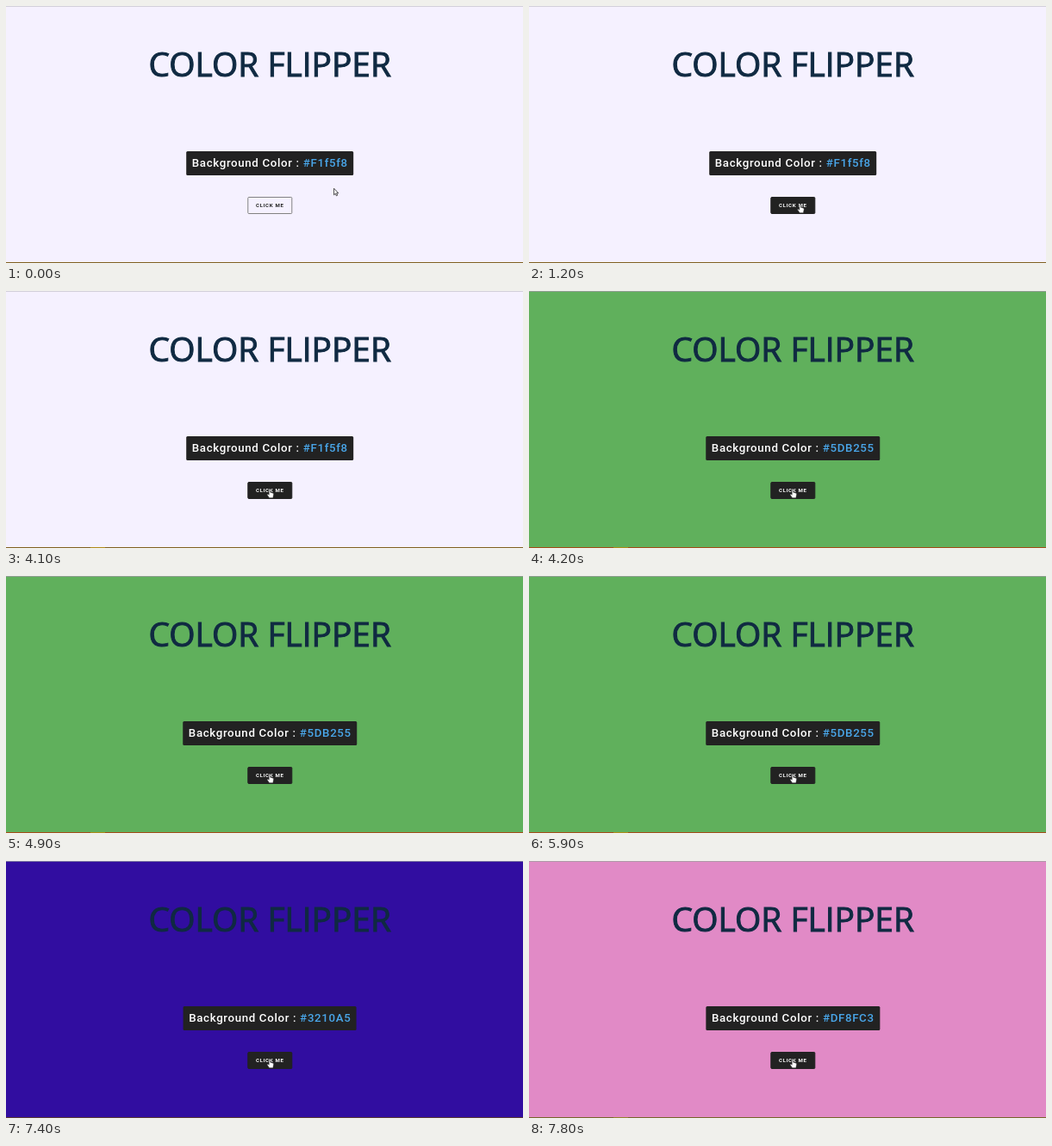
Write an HTML page that moves like this. It is 600x299 px and loops after 8000 ms.

```html
<!DOCTYPE html>
<html lang="en">
<head>
<meta charset="utf-8">
<title>Color Flipper</title>
<style>
html, body { margin: 0; width: 100%; height: 100%; overflow: hidden; }
#stage { position: relative; width: 600px; height: 299px; overflow: hidden; }
#stage > * { position: absolute; white-space: nowrap; }
h1, #label, #button { left: 306.3px; transform: translateX(-50%); margin: 0; box-sizing: border-box; }
h1 {
  top: 39px; font: 400 38.9px/56px "Open Sans", "Noto Sans", sans-serif;
  color: #102a42; -webkit-text-stroke: 1px #102a42;
}
#label {
  top: 168.5px; height: 28.2px; padding: 0 6.3px; border-radius: 1.5px; background: #222;
  font: 500 13.3px/28.4px Roboto, sans-serif; letter-spacing: .65px; color: #fff;
}
#code { color: #49a6e9; }
#button {
  top: 222.2px; width: 51.4px; height: 20px; border: 1px solid; border-radius: 1.5px;
  font: 700 6.1px/18.4px Roboto, sans-serif; letter-spacing: .65px; text-align: center;
}
.edge { left: 0; width: 600px; height: 1px; }
#top { top: 0; }
#bottom { top: 298px; }
#mark { left: 98px; top: 298px; width: 17px; height: 1px; }
svg { left: 0; top: 0; width: 16px; height: 16px; overflow: visible; }
</style>
</head>
<body>
<div id="stage">
  <div id="top" class="edge"></div>
  <h1>COLOR FLIPPER</h1>
  <div id="label">Background Color : <span id="code"></span></div>
  <div id="button">CLICK ME</div>
  <div id="bottom" class="edge"></div>
  <div id="mark"></div>
  <svg id="arrow"><path d="M.3 0V7.6L2 6 3.1 8.6 4.4 8 3.3 5.5H5.5Z" fill="#fff" stroke="#222" stroke-width=".8"/></svg>
  <svg id="hand"><path d="M-.8 .5Q0 -.5 .8 .5V4L2 4.2 4 5Q4.8 5.4 4.6 6.5L3.8 10.5H-.4L-3 6.7Q-2.8 5.6 -1.8 6.1L-.8 7Z" fill="#fff" stroke="#222" stroke-width=".5"/></svg>
</div>
<script>
const LOOP = 8000;
const $ = id => document.getElementById(id);
const looks = [
  { at: 0, code: "#F1f5f8", bg: "#f5f1ff", top: "#d3d0da", bottom: "#806021", mark: "" },
  { at: 3700, code: "#F1f5f8", bg: "#f5f1ff", top: "#d3d0da", bottom: "#806021", mark: "#b08a18" },
  { at: 4200, code: "#5DB255", bg: "#60b05c", top: "#8f9e91", bottom: "#a54b18", mark: "#b08a18" },
  { at: 6000, code: "#3210A5", bg: "#310da0", top: "#7772a0", bottom: "#5b3a33", mark: "" },
  { at: 7500, code: "#DF8FC3", bg: "#e18ac6", top: "#b09aa8", bottom: "#77642a", mark: "#94822c" }
];
// pointer stops: time, x, y
const path = [[100, 380.3, 212.2], [1000, 315, 230.2], [1200, 314.6, 230.2], [1600, 306, 230.2]];
const HOVER = 760;

const clamp = v => Math.max(0, Math.min(1, v));
const ease = v => v * v * (3 - 2 * v);
const mix = (a, b, v) => a + (b - a) * v;
const grey = v => `rgb(${v},${v},${v})`;

function pointer(t) {
  let [, x, y] = path[0];
  for (let i = 1; i < path.length; i++) {
    const [t0] = path[i - 1], [t1, x1, y1] = path[i];
    const v = ease(clamp((t - t0) / (t1 - t0)));
    x = mix(x, x1, v);
    y = mix(y, y1, v);
  }
  return [x, y];
}

function draw(t) {
  const look = looks.filter(l => l.at <= t).pop();
  $("stage").style.background = look.bg;
  $("code").textContent = look.code;
  for (const id of ["top", "bottom", "mark"]) $(id).style.background = look[id];

  const hover = clamp((t - HOVER) / 300);
  const button = $("button").style;
  button.background = `rgba(34,34,34,${hover})`;
  button.color = grey(Math.round(mix(34, 255, hover)));
  button.borderColor = grey(Math.round(mix(130, 34, hover)));

  const [x, y] = pointer(t);
  for (const id of ["arrow", "hand"]) {
    $(id).style.transform = `translate(${x}px,${y}px)`;
    $(id).style.visibility = (id === "hand") === (t >= HOVER) ? "visible" : "hidden";
  }
}

const start = performance.now();
function frame() {
  draw((performance.now() - start) % LOOP);
  requestAnimationFrame(frame);
}
draw(0);
requestAnimationFrame(frame);
</script>
</body>
</html>
```
